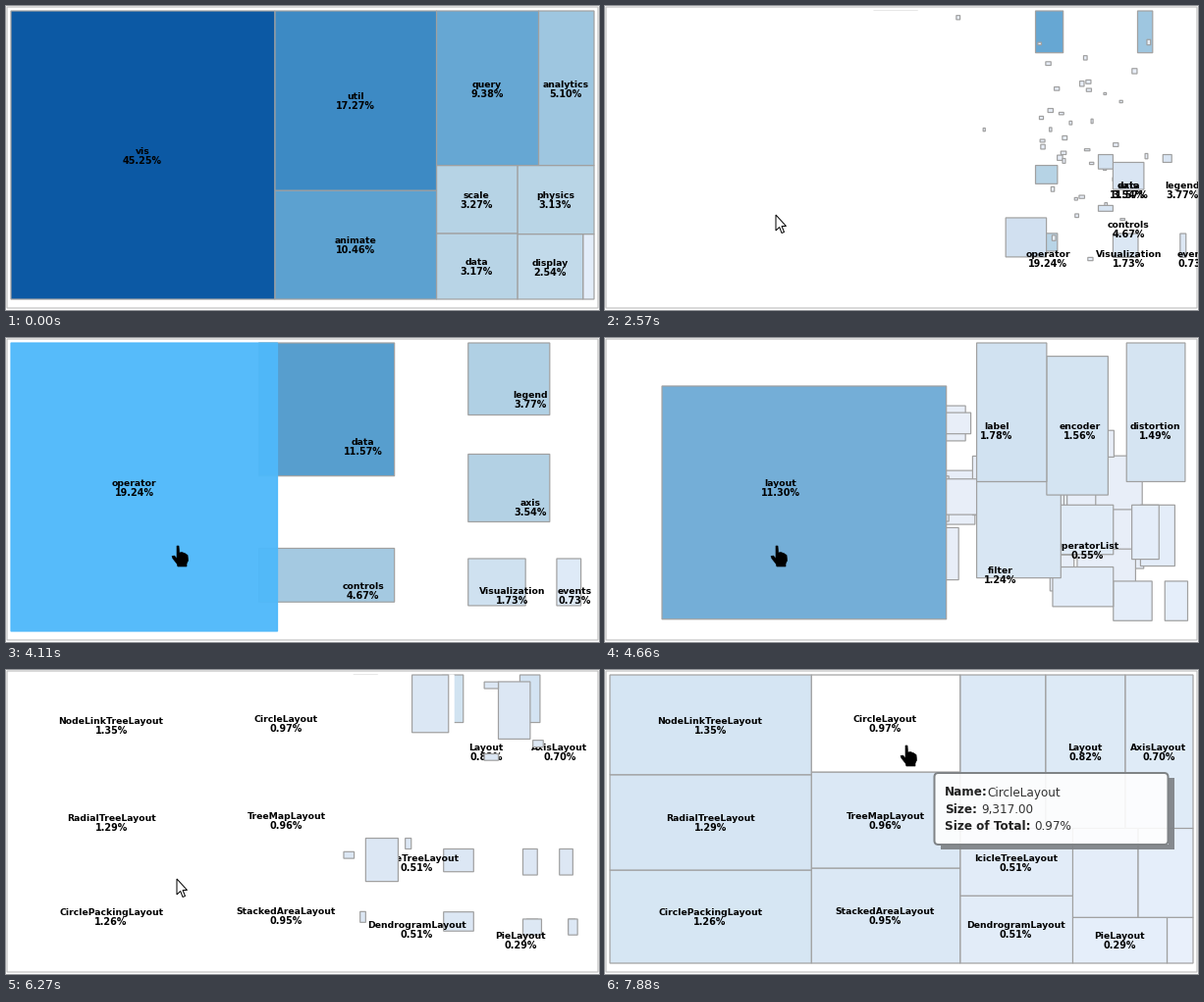
These frames come from a looping animation (604 px wide and 310 px high, 8000 ms). A matplotlib script:

```python
import itertools
import numpy as np
import matplotlib.pyplot as plt
from matplotlib.animation import FuncAnimation
from matplotlib.patches import FancyBboxPatch, Polygon, Rectangle, Wedge

W, H, DPI = 604, 310, 100
INTERVAL, FRAMES = 40, 200
CLICKS = (2090, 3710, 5800)
STEP = 77.5
PHI = (1 + 5 ** .5) / 2
AREA = (5, 5, 594, 294)
GREY = "#a0a0a0"
PALE = np.array((220, 231, 244)) / 255

# Each level lists its names with shares; "-" marks a tile too small for a label
CONTENT = [
    "vis 45.25 util 17.27 animate 10.46 query 9.38 analytics 5.10 scale 3.27 "
    "data 3.17 physics 3.13 display 2.54 - 0.43",
    "operator 19.24 data 11.57 controls 4.67 legend 3.77 axis 3.54 "
    "Visualization 1.73 events 0.73",
    "layout 11.30 label 1.78 encoder 1.56 distortion 1.49 filter 1.24 "
    "OperatorList 0.55 - 0.44 - 0.27 - 0.26 - 0.21 - 0.13",
    "NodeLinkTreeLayout 1.35 RadialTreeLayout 1.29 CirclePackingLayout 1.26 "
    "CircleLayout 0.97 TreeMapLayout 0.96 StackedAreaLayout 0.95 - 0.88 "
    "Layout 0.82 AxisLayout 0.70 IcicleTreeLayout 0.51 DendrogramLayout 0.51 "
    "- 0.39 - 0.33 PieLayout 0.29 - 0.08",
]
BRANCHES = {"physics", "legend", "axis", "distortion", "filter"}

RAMP = {0: (234, 241, 252), 3.3: (182, 211, 229), 10: (94, 163, 209),
        17.3: (61, 138, 196), 45: (12, 89, 164)}
HOVER = {"vis": (42, 127, 232), "operator": (79, 185, 250)}

HAND = np.array([(1, 0), (3, 0), (3.5, 7), (6, 6.5), (9, 7.5), (12, 9.5),
                 (12.5, 15), (11, 18), (11, 21), (2, 21), (1, 18), (-3, 13),
                 (-4, 10.5), (-1.5, 10), (1, 13)])
ARROW = np.array([(1, 1), (1, 17), (4.7, 13.5), (7, 19.5), (9.5, 18.5),
                  (7, 12.5), (11.5, 12.5)])


def treemap(values, x, y, w, h):
    """Squarified boxes (x, y, w, h) that aim at the golden ratio."""
    if not values:
        return []
    alpha = max(w / h, h / w) / (sum(values) * PHI)

    def misfit(row):
        beta = sum(row) ** 2 * alpha
        return max(max(row) / beta, beta / min(row))

    n = 1
    while n < len(values) and misfit(values[:n + 1]) <= misfit(values[:n]):
        n += 1
    row, rest = values[:n], values[n:]
    share = sum(row) / sum(values)
    ends = np.cumsum([0, *row]) / sum(row)
    if w >= h:
        cut = w * share
        boxes = [(x, y + a * h, cut, (b - a) * h) for a, b in zip(ends, ends[1:])]
        return boxes + treemap(rest, x + cut, y, w - cut, h)
    cut = h * share
    boxes = [(x + a * w, y, (b - a) * w, cut) for a, b in zip(ends, ends[1:])]
    return boxes + treemap(rest, x, y + cut, w, h - cut)


class Tile:
    def __init__(self, name, share, box):
        self.name = "" if name == "-" else name
        self.share = share
        self.box = np.array(box)
        self.center = self.box[:2] + self.box[2:] / 2
        self.color = np.array([np.interp(share, list(RAMP), channel)
                               for channel in zip(*RAMP.values())]) / 255
        self.lit = np.array(HOVER.get(name, (255, 255, 255))) / 255

    def contains(self, point):
        return np.all((point >= self.box[:2]) & (point < self.box[:2] + self.box[2:]))


def build_level(text):
    words = text.split()
    shares = [float(word) for word in words[1::2]]
    return [Tile(*parts) for parts in
            zip(words[::2], shares, treemap(shares, *AREA))]


def launch_boxes(tiles):
    """Child corners and shrunken boxes of the tiles being left, children first."""
    boxes = []
    for tile in tiles:
        if tile.name in BRANCHES:
            boxes += [np.array([x, y, 0, 0]) for x, y, _, _ in
                      treemap([4, 3, 3], *tile.box)]
        boxes.append(tile.box * (1, 1, .31, .31))
    return boxes


LEVELS = [build_level(text) for text in CONTENT]
for old, new in zip(LEVELS, LEVELS[1:]):
    for tile, start in zip(new, launch_boxes(old)[-len(new):]):
        tile.start = start

rng = np.random.default_rng(4)
SPECK_COUNT = 39
speck_size = rng.uniform(25, 80, (SPECK_COUNT, 2))
SPECK_END = np.hstack([rng.uniform(0, 1, speck_size.shape)
                       * (AREA[2:] - speck_size) + AREA[:2], speck_size])
SPECK_START = np.zeros((SPECK_COUNT, 4))
SPECK_START[:, 0] = rng.normal(490, 38, SPECK_COUNT)
SPECK_START[:, 1] = rng.normal(125, 60, SPECK_COUNT).clip(5, 285)

fig = plt.figure(figsize=(W / DPI, H / DPI), dpi=DPI, facecolor="white")
ax = fig.add_axes([0, 0, 1, 1])
ax.set_xlim(0, W)
ax.set_ylim(H, 0)
ax.axis("off")
order = itertools.count()


def px(size):
    return size * 72 / DPI


def mix(a, b, p):
    return a + (b - a) * p


def add(patch):
    patch.set_zorder(next(order))
    return ax.add_patch(patch)


def write(x, y, text, size, **style):
    return ax.text(x, y, text, fontsize=px(size), family="DejaVu Sans",
                   va="baseline", zorder=next(order), **style)


def draw_box(box, color, edge=GREY, alpha=1):
    x, y, w, h = box
    if w > 0.3 and h > 0.3:
        add(Rectangle((x, y), w, h, fc=color, ec=edge, lw=px(1.2), alpha=alpha,
                      snap=False))


def draw_label(tile, center):
    if tile.name:
        x, y = center
        style = dict(ha="center", weight="bold", color="black")
        write(x - .5, y - 1.2, tile.name, 9.3, **style)
        write(x - .5, y + 8.8, f"{tile.share:.2f}%", 9.7, **style)


def draw_leaving(tiles, shrink, lit):
    """Tiles shrink to their corners while the first one spreads and pales."""
    for tile in reversed(tiles):
        box, edge, alpha = tile.box.copy(), GREY, 1
        color = tile.lit if tile is lit else tile.color
        if shrink > 0 and tile is tiles[0]:
            box[2] = mix(box[2], AREA[2], shrink ** 2.77)
            pale = np.clip((shrink - .4) / .3, 0, 1)
            color = edge = mix(color, 1, pale)
            alpha = .96 if pale == 0 else 1
        else:
            box[2:] *= 1 - shrink
        draw_box(box, color, edge, alpha)
        if shrink < .5:
            draw_label(tile, tile.center)


def draw_arriving(tiles, k, lit):
    """Tiles fly from their launch boxes and grow into place."""
    p = np.interp(k, [5, 6, 12, 15], [0, .07, .79, 1])
    last = tiles is LEVELS[-1]
    if not last and p < 1:
        for box in mix(SPECK_START, SPECK_END, p):
            draw_box(box, "#e8eef8")
    glide = 1 if last else np.interp(k, [6, 10], [0, 1])
    for tile in reversed(tiles):
        color = tile.lit if tile is lit else mix(PALE, tile.color, p)
        draw_box(mix(tile.start, tile.box, p), color)
        draw_label(tile, mix(tile.start[:2] + (13, 25), tile.center, glide))


def draw_tooltip(x, y, tile, alpha):
    if alpha <= 0:
        return
    w, h = 238, 73
    for corner, sw, sh in (((x + w, y + 5), 6, h), ((x + 6, y + h), w - 6, 5)):
        add(Rectangle(corner, sw, sh, fc="#808488", lw=0, alpha=.95 * alpha))
    shape = dict(boxstyle="round,pad=0,rounding_size=4")
    add(FancyBboxPatch((x, y), w, h, fc="white", lw=0, alpha=.89 * alpha, **shape))
    add(FancyBboxPatch((x, y), w, h, fc="none", ec="#7f8386", lw=px(2),
                       alpha=alpha, **shape))
    rows = (("Name:", tile.name, 0), ("Size:", SIZES[tile.name], 4),
            ("Size of Total:", f"{tile.share:.2f}%", 4))
    for row, (key, value, gap) in enumerate(rows):
        base = y + 23.5 + 17.2 * row
        head = write(x + 10.5, base, key, 12, weight="bold", color="#222222",
                     alpha=alpha)
        write(head.get_window_extent().x1 + gap, base, value, 12,
              color="#333333", alpha=alpha)


SIZES = {"vis": "432,629.00", "layout": "108,083.00", "CircleLayout": "9,317.00"}


def draw_ripple(k):
    if 0 <= k < 3:
        add(Wedge((173, 212), 30, 0, 360, width=28.5 - 10.5 * k,
                  fc="#c3dc4e", lw=0, alpha=.75))


def cursor_at(t):
    times = [630, 860, 1090, 7000, 7480, 7700, 7820]
    return np.array([np.interp(t, times, [600, 252, 173, 173, 235, 312, 305]),
                     np.interp(t, times, [300, 242, 212, 212, 238, 94, 77])])


def draw_cursor(t, arrow):
    if t <= 635:
        return
    if arrow:
        add(Polygon(ARROW + cursor_at(t), fc="white", ec="black", lw=px(1)))
    else:
        add(Polygon(HAND + cursor_at(t), fc="black", ec="black", lw=px(.6)))


def update(n):
    global order
    order = itertools.count(1)
    for artist in list(ax.patches) + list(ax.texts):
        artist.remove()

    t = n * INTERVAL + 30
    drill = sum(t >= click for click in CLICKS) - 1
    k = int((t - CLICKS[drill]) / STEP) if drill >= 0 else -1
    add(Rectangle((1, 1), 602, 307, fc="white", ec="#c0c0c0", lw=px(1.2),
                  snap=False))

    if drill < 0:
        draw_leaving(LEVELS[0], 0, LEVELS[0][0] if t > 850 else None)
    else:
        old, new = LEVELS[drill:drill + 2]
        if k < 7:
            shrink = np.clip((k * STEP - 105) / 400, 0, 1) ** 3
            draw_leaving(old, shrink, old[0] if drill == 0 or k >= 1 else None)
        if k >= 6:
            under = [tile for tile in new if tile.contains(cursor_at(t))]
            draw_arriving(new, k, under[0] if under and t > 7430 else None)
        draw_ripple(k)

    fade_out = np.interp(k, [0, 3], [1, 0])
    if t < CLICKS[1]:
        alpha = np.interp(t, [850, 1090], [0, 1]) if drill < 0 else fade_out
        draw_tooltip(271.5, 253, LEVELS[0][0], alpha)
    elif t < 7400:
        alpha = np.interp(k, [12, 15], [0, 1]) if drill == 1 else fade_out
        draw_tooltip(193.5, 223, LEVELS[2][0], alpha)
    else:
        alpha = np.interp(t, [7660, 7880], [0, 1])
        draw_tooltip(335.5, 105, LEVELS[3][3], alpha)
    draw_cursor(t, drill >= 0 and 6 <= k <= 9)
    return []


anim = FuncAnimation(fig, update, frames=FRAMES, interval=INTERVAL,
                     init_func=lambda: [], repeat=True, repeat_delay=0)
plt.show()
```
